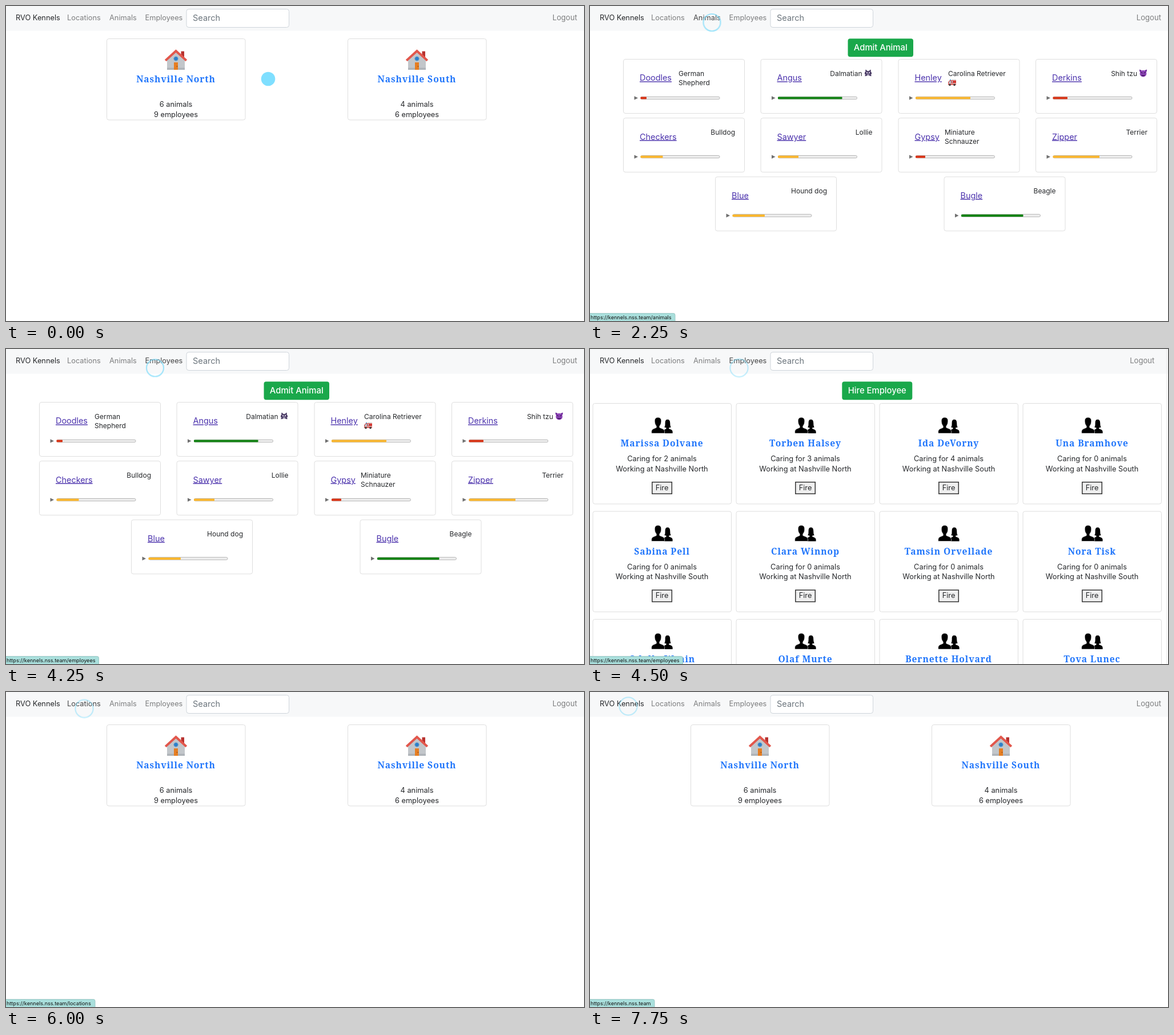
An HTML page that plays this animation: 1012 px wide and 553 px high, repeating every 8000 ms.

```html
<!DOCTYPE html>
<html lang="en">
<head>
<meta charset="utf-8">
<title>Kennels</title>
<style>
html, body { margin: 0; width: 100%; height: 100%; overflow: hidden; background: #fff; }
svg { display: block; width: 1012px; height: 553px; }
text { font: 12.8px Inter, "Open Sans", sans-serif; fill: #26282b; white-space: pre; }
.mid { text-anchor: middle; }
.end { text-anchor: end; }
.card { fill: #fff; stroke: #dedede; }
.head { font: 800 15.6px "Noto Serif", serif; letter-spacing: .9px; fill: #2176fb; }
.link { fill: #7d7e7f; }
.name { font-size: 14.4px; fill: #4c33ad; text-decoration: underline; }
.breed { font-size: 12px; }
.search { font-size: 14.5px; fill: #6c757d; }
.btn { font-size: 14.8px; font-weight: 500; fill: #fff; }
.url { font-size: 9.1px; fill: #111; }

/* every change is a hard cut on a 250 ms grid */
.page, .tip, .link, .pointer, #disc, #ring, #logout { animation: 8s step-end infinite; }
.tip, .page { visibility: hidden; }
#locations { animation-name: locations; }
#animals { animation-name: animals; }
#employees { animation-name: employees; }
@keyframes locations { 0%, 75% { visibility: visible } 28.125% { visibility: hidden } 100% { visibility: visible } }
@keyframes animals { 0%, 56.25%, 100% { visibility: hidden } 28.125% { visibility: visible } }
@keyframes employees { 0%, 75%, 100% { visibility: hidden } 56.25% { visibility: visible } }

#nav-locations { animation-name: hover-locations; }
#nav-animals { animation-name: hover-animals; }
#nav-employees { animation-name: hover-employees; }
@keyframes hover-locations { 0%, 84.375%, 100% { fill: #7d7e7f } 71.875% { fill: #454647 } }
@keyframes hover-animals { 0%, 40.625%, 71.875%, 100% { fill: #7d7e7f } 21.875%, 68.75% { fill: #454647 } }
@keyframes hover-employees { 0%, 68.75%, 100% { fill: #7d7e7f } 43.75% { fill: #454647 } }

#tip-animals { animation-name: tip-animals; }
#tip-employees { animation-name: tip-employees; }
#tip-locations { animation-name: tip-locations; }
#tip-home { animation-name: tip-home; }
@keyframes tip-animals { 0%, 43.75%, 71.875%, 100% { visibility: hidden } 25%, 68.75% { visibility: visible } }
@keyframes tip-employees { 0%, 68.75%, 100% { visibility: hidden } 43.75% { visibility: visible } }
@keyframes tip-locations { 0%, 87.5%, 100% { visibility: hidden } 71.875% { visibility: visible } }
@keyframes tip-home { 0% { visibility: hidden } 90.625%, 100% { visibility: visible } }

#logout { font-size: 13.1px; animation-name: logout; }
@keyframes logout { 0%, 75%, 100% { transform: none } 56.25% { transform: translateX(-11.7px) } }

.pointer { animation-name: travel; }
@keyframes travel {
  0% { transform: translate(459px, 128px) }
  9.375% { transform: translate(436px, 119px) }
  12.5% { transform: translate(328px, 76px) }
  15.625% { transform: translate(232.5px, 40.5px) }
  18.75% { transform: translate(219px, 32px) }
  21.875% { transform: translate(213.5px, 29px) }
  37.5% { transform: translate(217px, 30px) }
  40.625% { transform: translate(236px, 32px) }
  43.75% { transform: translate(255px, 33px) }
  46.875% { transform: translate(261px, 33.3px) }
  65.625% { transform: translate(252px, 33px) }
  68.75% { transform: translate(195px, 31px) }
  71.875% { transform: translate(137px, 29.3px) }
  81.25% { transform: translate(133px, 29px) }
  84.375% { transform: translate(102px, 27px) }
  87.5% { transform: translate(78px, 25.5px) }
  90.625%, 100% { transform: translate(67px, 25px) }
}
#disc { animation-name: disc; }
@keyframes disc {
  0%, 34.375%, 59.375%, 78.125% { opacity: 1 }
  28.125%, 53.125%, 71.875%, 93.75%, 100% { opacity: 0 }
}
#ring { animation-name: ring; }
@keyframes ring {
  0%, 34.375%, 59.375%, 78.125% { opacity: 0; r: 15px }
  28.125%, 53.125%, 71.875%, 93.75% { opacity: .72; r: 15px }
  31.25%, 56.25%, 75%, 96.875%, 100% { opacity: .48; r: 15.6px }
}
</style>
</head>
<body>
<svg id="stage" viewBox="0 0 1012 553">
  <defs>
    <g id="house">
      <path d="M9 3h5.500v12H9z" fill="#b8322f"/>
      <path d="M-15.500 17L0 3L15.500 17V35.500H-15.500z" fill="#c2c6ca"/>
      <path d="M-15.500 32h31v3.500h-31z" fill="#aeb3b8"/>
      <path d="M-18.300 19.300L0 2.500L18.300 19.300" fill="none" stroke="#e2574c" stroke-width="4"/>
      <circle cy="16" r="3.800" fill="#2d7fc9" stroke="#7fa9cc"/>
      <path d="M-3.500 22.500h7v13h-7z" fill="#e67e22"/>
      <circle cx="2" cy="29.500" r=".8" fill="#7a3c10"/>
    </g>
    <g id="people">
      <path d="M3 28V22.500Q5 21 7.500 20V18.300L4.300 17.500Q6 14.500 5.600 9.500Q5.500 3.800 9.800 3.800T14.200 9.500Q14 14.500 15.600 17.500L12.200 18.300V20Q18.600 21.500 18.600 25V28z"/>
      <path d="M-18.300 28V24.500Q-18.300 21.500 -14.500 20L-9.800 18V15.300Q-12.800 12 -12.800 6.500Q-12.800 0 -7 0T-1.200 6.500Q-1.200 12 -4.200 15.300V18L.8 20Q4.600 21.500 4.600 24.500V28z" stroke="#fff" stroke-width=".6"/>
    </g>
    <g id="monster">
      <path d="M-5 -6h2l1.200 2h3.600L3 -6h2L4.500 -3.500L6 -1V2h-1.500L6 5H3L1.500 3.500h-3L-3 5H-6L-4.500 2H-6V-1L-4.500 -3.500z" fill="#51436b"/>
      <path d="M-3 -2h2v2h-2zM1 -2h2v2h-2zM-2 1.300h4v1h-4z" fill="#d6cee3"/>
    </g>
    <g id="devil">
      <path d="M-6.500 -6.500Q-3.500 -6 -2 -4L-5 -1Q-7 -4 -6.500 -6.500M6.500 -6.500Q3.500 -6 2 -4L5 -1Q7 -4 6.500 -6.500" fill="#6d279a"/>
      <circle cy=".7" r="5.900" fill="#8e45b8"/>
      <path d="M-4 -1.500L-1 0M4 -1.500L1 0M-3 3Q0 5.500 3 3" fill="none" stroke="#35104f" stroke-width="1.300"/>
    </g>
    <g id="engine">
      <path d="M-7 -1L-4 -4H7V4H-7z" fill="#d43a35"/>
      <path d="M-5.800 -.7L-3.700 -2.800H-2V.5H-5.800zM-.8 -2.700h2v2.500h-2z" fill="#a9d5e8"/>
      <path d="M-6.500 1.700H7M-1 -5.200H7" stroke="#d9d9d9" stroke-width="1.200"/>
      <path d="M-4 -5.500h2v1.500h-2z" fill="#3c87c4"/>
      <g fill="#333"><circle cx="-4" cy="4" r="1.700"/><circle cx="4" cy="4" r="1.700"/></g>
    </g>
  </defs>
</svg>
<script>
const text = (x, y, str, cls = "", id = "") =>
  `<text x="${x}" y="${y}" class="${cls}"${id && ` id="${id}"`}>${str}</text>`;
const box = (x, y, w, h, attrs) =>
  `<rect x="${x}" y="${y}" width="${w}" height="${h}" ${attrs}/>`;
const card = (x, y, w, h) => box(x, y, w, h, 'rx="3.5" class="card"');
const icon = (id, x, y) => `<use href="#${id}" x="${x}" y="${y}"/>`;
const page = (id, body) => `<g class="page" id="${id}">${body}</g>`;
const button = (x, w, label) =>
  box(x, 57.3, w, 31.9, 'rx="4" fill="#1aa84b"') + text(x + w / 2, 78.3, label, "btn mid");

const nav =
  box(0, 0, 1012, 43.5, 'fill="#f7f8f9"') +
  text(17, 24.6, "RVO Kennels") +
  text(107, 24.6, "Locations", "link", "nav-locations") +
  text(181, 24.6, "Animals", "link", "nav-animals") +
  text(243.5, 24.6, "Employees", "link", "nav-employees") +
  box(316, 5.5, 179.5, 32, 'rx="4" fill="#fff" stroke="#ced4da"') +
  text(327, 26.3, "Search", "search") +
  text(1000, 24.6, "Logout", "link end", "logout");

const place = (x, name, animals, staff) => {
  const mid = x + 121;
  return card(x, 57.5, 242.5, 142.5) + icon("house", mid, 76.5) +
    text(mid, 133.5, name, "head mid") +
    text(mid, 177, `${animals} animals`, "mid") +
    text(mid, 194.5, `${staff} employees`, "mid");
};
const locations = place(176.5, "Nashville North", 6, 9) + place(598.5, "Nashville South", 4, 6);

const RED = "#da3517", AMBER = "#fbb72f", GREEN = "#138314";
const columns = [58.5, 299, 540, 780.5];
const dog = (x, y, name, breed, level, color) =>
  card(x, y, 212, 95) +
  text(x + 28.5, y + 37.8, name, "name") + breed(x, y) +
  `<path d="M${x + 19} ${y + 64.7}l6.500 3.300l-6.500 3.300z" fill="#707070"/>` +
  box(x + 30.5, y + 65.8, 138, 4.4, 'rx="2.2" fill="#efefef" stroke="#b4b4b4"') +
  box(x + 30, y + 66, level, 4, `rx="1" fill="${color}"`);
const right = (str, emoji) => (x, y) =>
  text(x + (emoji ? 177.5 : 195.5), y + 29.3, str, "breed end") +
  (emoji ? icon(emoji, x + 188, y + 24.5) : "");
const lines = (dx, first, second, emoji) => (x, y) =>
  text(x + dx, y + 29.3, first, "breed") +
  (emoji ? icon(emoji, x + dx + 7, y + 41) : text(x + dx, y + 45.3, second, "breed"));

const dogs = [
  ["Doodles", lines(96.5, "German", "Shepherd"), 10.5, RED],
  ["Angus", right("Dalmatian", "monster"), 112.5, GREEN],
  ["Henley", lines(87, "Carolina Retriever", "", "engine"), 96, AMBER],
  ["Derkins", right("Shih tzu", "devil"), 25.5, RED],
  ["Checkers", right("Bulldog"), 39, AMBER],
  ["Sawyer", right("Lollie"), 36, AMBER],
  ["Gypsy", lines(81, "Miniature", "Schnauzer"), 17, RED],
  ["Zipper", right("Terrier"), 81.5, AMBER],
  ["Blue", right("Hound dog"), 56.5, AMBER],
  ["Bugle", right("Beagle"), 108.5, GREEN]
];
const animals = button(451.5, 114.5, "Admit Animal") + dogs.map((d, i) => {
  const x = i < 8 ? columns[i % 4] : [219.5, 620][i - 8];
  return dog(x, 93.5 + 103.2 * Math.floor(i / 4), ...d);
}).join("");

const staff = [
  ["Marissa Dolvane", 2, "North"], ["Torben Halsey", 3, "North"],
  ["Ida DeVorny", 4, "South"], ["Una Bramhove", 0, "South"],
  ["Sabina Pell", 0, "South"], ["Clara Winnop", 0, "North"],
  ["Tamsin Orvellade", 0, "North"], ["Nora Tisk", 0, "South"],
  ["Odella Wrain", 0, "North"], ["Olaf Murte", 0, "North"],
  ["Bernette Holvard", 0, "South"], ["Tova Lunec", 0, "North"]
];
const person = ([name, count, site], i) => {
  const x = 5 + 251 * (i % 4), y = 95.5 + 189.5 * Math.floor(i / 4), mid = x + 121;
  return card(x, y, 242.5, 176.5) + icon("people", mid, y + 24.5) +
    text(mid, y + 75.5, name, "head mid") +
    text(mid, y + 101.5, `Caring for ${count} animals`, "mid") +
    text(mid, y + 119.2, `Working at Nashville ${site}`, "mid") +
    box(mid - 17.2, y + 138.2, 34.5, 20.5, 'fill="#efefef" stroke="#343434" stroke-width="1.5"') +
    text(mid, y + 152.3, "Fire", "mid");
};
const employees = button(441.3, 123, "Hire Employee") + staff.map(person).join("") +
  '<path d="M1009.500 0V553" stroke="#ececec"/>';

const tip = (id, w, path) =>
  `<g class="tip" id="tip-${id}">` +
  box(-4, 539.5, w + 4, 18, 'rx="3" fill="#a9dfdc" stroke="#92bfbd" stroke-width=".8"') +
  text(1, 550.3, "https://kennels.nss.team" + path, "url") + "</g>";

const stage = document.getElementById("stage");
stage.insertAdjacentHTML("beforeend",
  nav + page("locations", locations) + page("animals", animals) + page("employees", employees) +
  tip("animals", 149, "/animals") + tip("employees", 162.5, "/employees") +
  tip("locations", 156, "/locations") + tip("home", 113, "") +
  `<g class="pointer"><circle id="disc" r="12.3" fill="#7fdfff"/>
   <circle id="ring" r="15" fill="none" stroke="#7fdcfa" stroke-width="2.2"/></g>`);
</script>
</body>
</html>
```
